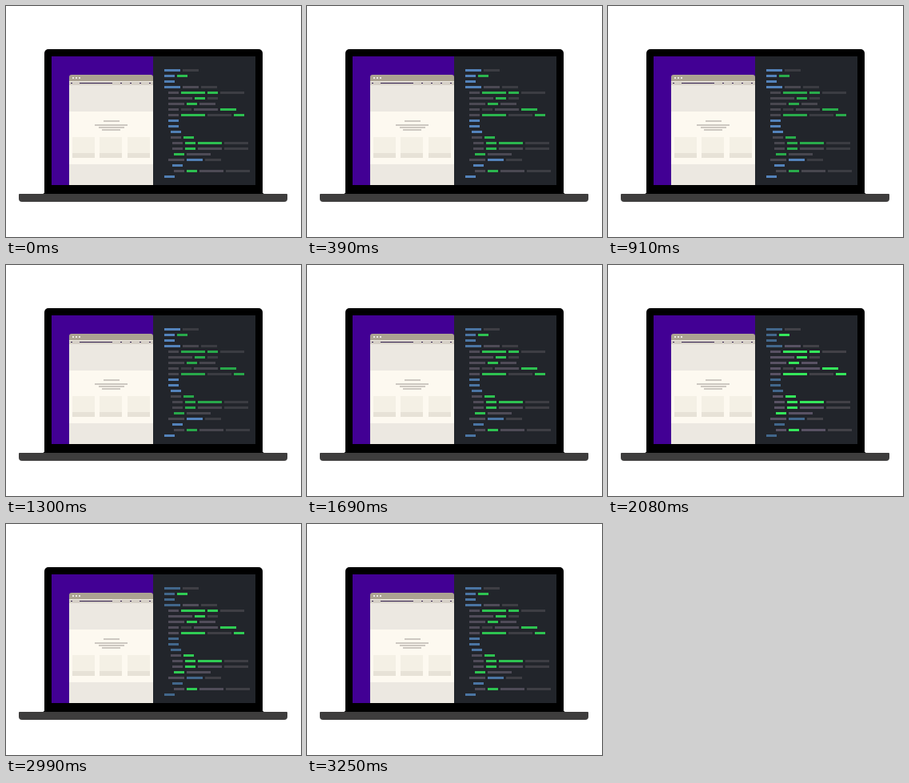
Write an HTML page with a canvas that moves like this. It is 369 px wide and 289 px high and loops after 3380 ms.

```html
<!DOCTYPE html>
<html>
<head>
<meta charset="utf-8">
<style>
html, body { margin: 0; width: 100%; height: 100%; overflow: hidden; background: #fff; }
canvas { display: block; }
</style>
</head>
<body>
<canvas id="stage" width="369" height="289"></canvas>
<script>
const ctx = document.getElementById('stage').getContext('2d');
const LOOP = 3380, STEP = 130;

// Each row: indent, then tokens of kind + width class
const rows = `0 b2 d2|0 b1 g1|0 b1|0 b2 l2 d2|5 l1 g3 g1 d3|5 l3 g1 d1|5 l2 g1 l2
5 l1 d1 l3 g2|5 l1 g3 d3 g1|5 b1|5 b1|8 b1|8 l1 g1|10 l1 g1 g3 d3|10 l1 g1 l3 d3
12 g1 l3|5 l2 b2 d2|10 b1|12 l1 g1 l3 d3|0 b1`.split(/[|\n]/).map(row => row.split(' '));
const widths = [0, 13, 20, 30];

// Resting and highlighted colour of each token kind
const palette = {
  b: [[84, 131, 187], [66, 103, 139]],
  g: [[40, 168, 74], [54, 234, 92]],
  l: [[71, 70, 78], [90, 83, 101]],
  d: [[59, 60, 66], [66, 65, 71]]
};

function rect(color, x, y, w, h, radii = 0) {
  ctx.fillStyle = color;
  ctx.beginPath();
  ctx.roundRect(x, y, w, h, radii);
  ctx.fill();
}

function mix([from, to], k) {
  return `rgb(${from.map((v, i) => Math.round(v + (to[i] - v) * k))})`;
}

function progress(t, from, to) {
  return Math.min(1, Math.max(0, (t - from) / (to - from)));
}

function smooth(t, from, to) {
  const p = progress(t, from, to);
  return p * p * (3 - 2 * p);
}

function drawLaptop() {
  rect('#fff', 0, 0, 369, 289);
  rect('#000', 48, 54, 273, 181, [5, 5, 0, 0]);
  rect('#000', 47, 234, 275, 1);
  rect('#3e3d3d', 16, 235, 336, 10, [1, 1, 4, 4]);
  rect('#420094', 57, 63, 127, 161);
  rect('#22252b', 184, 63, 128, 161);
}

function drawBrowser() {
  rect('#aca392', 79, 86, 105, 8, [3, 3, 0, 0]);
  for (const x of [83, 87, 91]) rect('#fff', x, 89, 2, 2, 1);
  rect('#ece8e1', 79, 94, 105, 130);
  rect('#d5cfc6', 79, 95, 105, 4);
  rect('#33204f', 92, 96, 41, 1);
  for (const x of [81, 143, 155, 167, 179]) rect('#33204f', x, 96, 2, 1);
  rect('#fdf9f0', 79, 132, 105, 66);
  for (const [x, y, w] of [[122, 143, 20], [111, 148, 41], [116, 151, 32], [120, 154, 23]])
    rect('#cdc8c1', x, y, w, 2);
  for (const x of [83, 117, 152]) {
    rect('#f4f0e5', x, 164, 28, 20);
    rect('#e7e2d7', x, 184, 28, 6);
  }
}

function drawCode(glow, dim) {
  rows.forEach(([indent, ...tokens], i) => {
    let x = 198 + Number(indent);
    for (const [kind, size] of tokens) {
      rect(mix(palette[kind], kind === 'b' ? dim : glow), x, 79 + i * 7, widths[size], 3);
      x += widths[size] + 3;
    }
  });
}

function draw(now) {
  // The pulse begins at 1300 ms and fades across the loop boundary
  const stepped = Math.floor(now % LOOP / STEP) * STEP;
  const t = stepped < 1300 ? stepped + LOOP : stepped;
  const glow = smooth(t, 1300, 2200) * (1 - progress(t, 2200, 1300 + LOOP)) ** 1.6;
  const dim = smooth(t, 1300, 2080) * (1 - smooth(t, 2990, 3510));
  drawLaptop();
  drawBrowser();
  drawCode(glow, dim);
}

const start = performance.now();
function tick() {
  draw(performance.now() - start);
  requestAnimationFrame(tick);
}
tick();
</script>
</body>
</html>
```
